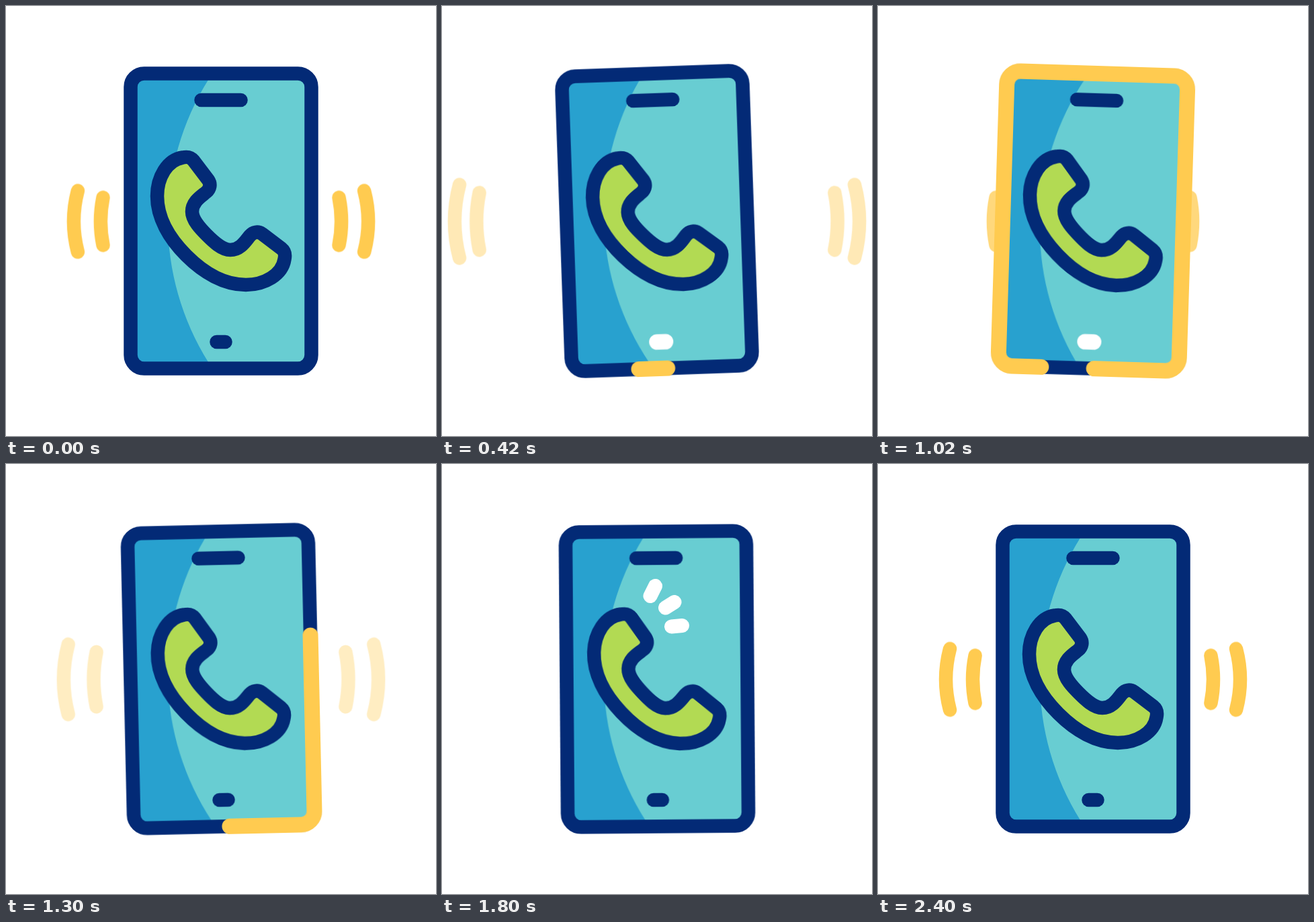
Recreate the animation shown at these times as an HTML page. Size 640 by 640 pixels, loop 2.6 s.

```html
<!DOCTYPE html>
<html lang="en">
<head>
<meta charset="utf-8">
<title>Ringing phone</title>
<style>
html, body { margin: 0; width: 100%; height: 100%; overflow: hidden; background: #fff; }
svg { display: block; width: 100%; height: 100%; }
:root {
  --navy: #032a76; --yellow: #ffcb50; --loop: 2600ms infinite;
  --soft: cubic-bezier(.333, 0, .667, 1);
}
path { fill: none; stroke-linecap: round; stroke-linejoin: round; }
.line { stroke: var(--navy); stroke-width: 20.5; }
.phone, .handset { transform-origin: 320px 320px; }
.phone { animation: sway var(--loop) var(--soft); }
.handset { animation: rock var(--loop) var(--soft); }

.trim { stroke-dasharray: 1 1; stroke-dashoffset: 1; stroke-width: 23; }
.ring { stroke: var(--yellow); animation: ring var(--loop) var(--soft), ring-on var(--loop) step-end; }
.button { stroke: #fff; animation: press var(--loop) linear, press-on var(--loop) step-end; }
.spark { stroke: #fff; stroke-width: 21; animation: spark var(--loop) var(--soft), spark-on var(--loop) step-end; }

.waves { animation: fade var(--loop) linear; }
.waves path { stroke: var(--yellow); stroke-width: 20.5; vector-effect: non-scaling-stroke; }
.outer { animation: outer var(--loop) linear; }
.inner { animation: inner var(--loop) linear; }

@keyframes sway {
  0% { transform: rotate(0); }
  15.4%, 26.54% { transform: rotate(-2deg); }
  36.54% { transform: rotate(2deg); }
  55%, 62.31% { transform: rotate(-2deg); }
  72.31%, 100% { transform: rotate(0); }
}
@keyframes rock {
  0%, 5.385% { transform: rotate(0); }
  29.23%, 30.77% { transform: rotate(-3deg); }
  40% { transform: rotate(1.6deg); }
  50% { transform: rotate(1.1deg); }
  69.23% { transform: rotate(1.8deg); }
  82.3%, 100% { transform: rotate(0); }
}
@keyframes ring {
  0%, 13.846% { stroke-dashoffset: 1; }
  36.154% { stroke-dashoffset: 0; }
  57.692%, 100% { stroke-dashoffset: -1; }
}
@keyframes ring-on {
  0%, 57.692%, 100% { opacity: 0; }
  13.846% { opacity: 1; }
}
@keyframes press {
  0%, 13.077% { stroke-dashoffset: 1; }
  15.385%, 16.923% { stroke-dashoffset: 0; }
  20.769% { stroke-dashoffset: -1; }
  20.77%, 36.154% { stroke-dashoffset: 1; }
  38.462%, 40% { stroke-dashoffset: 0; }
  43.846%, 100% { stroke-dashoffset: -1; }
}
@keyframes press-on {
  0%, 20.769%, 43.846%, 100% { opacity: 0; }
  13.077%, 36.154% { opacity: 1; }
}
@keyframes spark {
  0%, 63.077% { stroke-dashoffset: 1; }
  67.692%, 80% { stroke-dashoffset: 0; }
  85.385%, 100% { stroke-dashoffset: -1; }
}
@keyframes spark-on {
  0%, 85.385%, 100% { opacity: 0; }
  63.077% { opacity: 1; }
}
@keyframes fade {
  0%, 7.692% { opacity: 1; }
  16.154% { opacity: .42; }
  21.923%, 37.69% { opacity: 0; }
  37.7%, 39.231% { opacity: .75; }
  50% { opacity: .35; }
  57.692%, 78.46% { opacity: 0; }
  78.47%, 100% { opacity: 1; }
}
@keyframes outer {
  0% { transform: translate(101px, 320.5px); }
  16.154% { transform: translate(19px, 320.5px) scale(1.2); }
  21.923% { transform: translate(-10px, 320.5px) scale(1.27); }
  21.93%, 37.692% { transform: translate(190px, 320.5px) scale(.75); }
  39.231% { transform: translate(177px, 320.5px) scale(.78); }
  50% { transform: translate(86px, 320.5px) scale(1.145); }
  57.692% { transform: translate(42px, 320.5px) scale(1.22); }
  57.7%, 78.462% {
    transform: translate(185px, 320.5px) scale(.78);
    animation-timing-function: cubic-bezier(.215, .61, .355, 1);
  }
  92.308%, 100% { transform: translate(101px, 320.5px) scale(1); }
}
@keyframes inner {
  0% { transform: translate(141px, 320.5px); }
  16.154% { transform: translate(51.5px, 320.5px) scale(1.2); }
  21.923% { transform: translate(19px, 320.5px) scale(1.27); }
  21.93%, 37.692% { transform: translate(178px, 320.5px) scale(.95); }
  39.231% { transform: translate(172px, 320.5px) scale(1); }
  50% { transform: translate(130.5px, 320.5px) scale(1.145); }
  57.692% { transform: translate(110px, 320.5px) scale(1.22); }
  57.7%, 78.462% {
    transform: translate(185px, 320.5px) scale(.95);
    animation-timing-function: cubic-bezier(.215, .61, .355, 1);
  }
  92.308%, 100% { transform: translate(141px, 320.5px) scale(1); }
}
</style>
</head>
<body>
<svg viewBox="0 0 640 640">
  <g class="waves">
    <path class="outer" d="M6-45.5Q-6 0 6 45.5"/>
    <path class="inner" d="M3.6-35.5Q-3.6 0 3.6 35.5"/>
  </g>
  <g transform="matrix(-1 0 0 1 640 0)">
    <g class="waves">
      <path class="outer" d="M6-45.5Q-6 0 6 45.5"/>
      <path class="inner" d="M3.6-35.5Q-3.6 0 3.6 35.5"/>
    </g>
  </g>

  <g class="phone">
    <rect x="186" y="101" width="268" height="438" rx="19" fill="#68cdd2"/>
    <path d="M301 110A397 397 0 0 0 301 530H205.500a20 20 0 0 1-20-20V120a20 20 0 0 1 20-20H307Z" style="fill:#28a1cf"/>
    <path class="line" d="M328 539.500H205.500a20 20 0 0 1-20-20V120.500a20 20 0 0 1 20-20H434.500a20 20 0 0 1 20 20V519.500a20 20 0 0 1-20 20Z"/>
    <path class="line" d="M290.500 140H349.500"/>
    <path class="line" d="M313.500 500H326.500"/>
    <path class="trim button" pathLength="1" d="M313.500 500H326.500"/>
    <path class="trim ring" pathLength="1" d="M328 539.500H205.500a20 20 0 0 1-20-20V120.500a20 20 0 0 1 20-20H434.500a20 20 0 0 1 20 20V519.500a20 20 0 0 1-20 20H328"/>
  </g>

  <path class="trim spark" pathLength="1" d="M310 196.500L317.500 181.500"/>
  <path class="trim spark" pathLength="1" d="M332.500 214L346 205.500"/>
  <path class="trim spark" pathLength="1" d="M341.500 242L357.500 240.500"/>

  <g class="handset">
    <path class="line" style="fill:#b2da53" d="M263 225.500C270 224 275 225 279 230L301 259C305 265 304 272 298 277C291 283 277 291 277 306C277 319 290 332 299 341C308 350 321 363 334 363C349 363 357 349 363 342C368 336 375 335 381 339L410 361C415 365 416 370 414.500 377C411 400 385 415 357 415C325 415 294 397 268.500 371.500C243 346 225 315 225 283C225 255 240 229 263 225.500Z"/>
  </g>
</svg>
</body>
</html>
```
